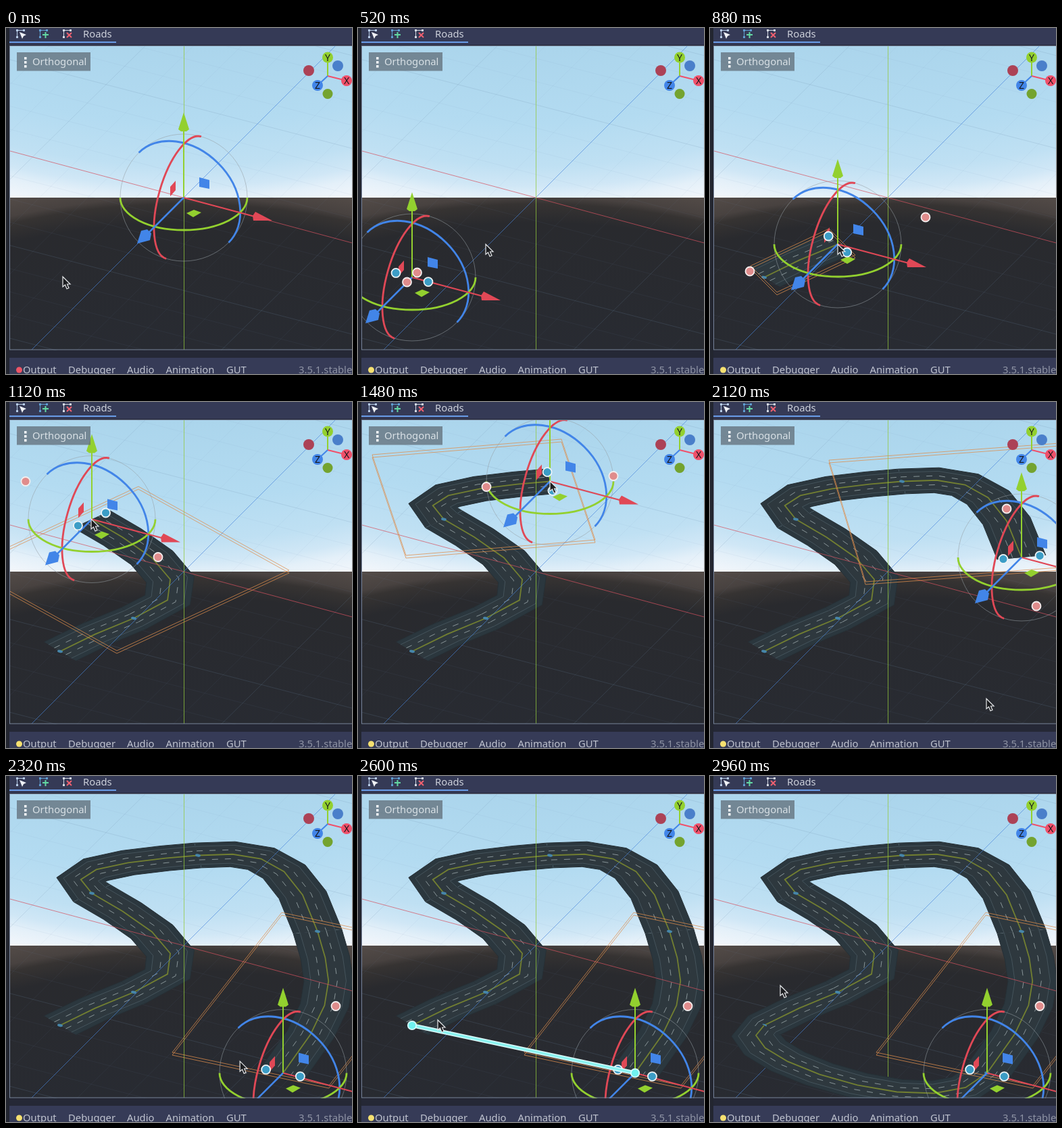
An HTML page with a canvas that plays this animation: 512 by 512 pixels, repeating every 3000 ms.

```html
<!DOCTYPE html>
<html>
<head>
<meta charset="utf-8">
<style>
  html, body { margin: 0; width: 512px; height: 512px; overflow: hidden; background: #252836; }
  canvas { display: block; }
</style>
</head>
<body>
<canvas id="stage" width="512" height="512"></canvas>
<script>
const g = document.getElementById('stage').getContext('2d');
const LOOP = 3000, STEP = 40, LINK_AT = 2560, CLOSE_AT = 2760;
const RED = '#e04856', GREEN = '#93d02f', BLUE = '#4285e8';
const ORANGE = 'rgba(222,142,76,.75)';

// Screen directions of the ground axes, and road sizes in ground units.
const X = [131, 34], Z = [-69, 68];
const HALF_ROAD = .245, HALF_LANES = .185;

const ORIGIN = [263, 251];
// Road points: time placed, position, heading, curve reach before and after,
// first heading shown (aim) and three corners of the selection box.
const POINTS = [
  { at: 120, pos: [80,369], dir: [80,-36], before: 1, after: .4, aim: [7.5,-7] },
  { at: 640, pos: [189,320], dir: [130,-40], before: .3, after: 1,
    box: [[60,352], [176,297], [215,336]] },
  { at: 1120, pos: [127,173.5], dir: [-98,-56], before: .7, after: .7,
    box: [[196,125], [419,249], [164,368]] },
  { at: 1400, pos: [284,117.5], dir: [94,-8], before: .7, after: 1,
    box: [[21,78], [301,55], [351,204]] },
  { at: 1840, pos: [461,230], dir: [22,72], before: 1.5, after: 1,
    box: [[694,232], [230,266], [176,86]] },
  { at: 2200, pos: [410,439.5], dir: [-78,99], before: 1.1, after: .87,
    box: [[478,458], [246,409], [408,202]] }
];

// Pointer moves: start time, end time, destination.
const MOVES = [
  [40, 160, [80,370]], [360, 520, [189,320]], [920, 1120, [126,173]],
  [1200, 1400, [284,117]], [1480, 1760, [461,230]], [1840, 2120, [409,439]],
  [2200, 2600, [118,361]], [2600, 2720, [81,369]], [2760, 2960, [104,310]]
];

const add = (a, b, k = 1) => [a[0] + b[0] * k, a[1] + b[1] * k];
const mix = (a, b, k) => [a[0] + (b[0] - a[0]) * k, a[1] + (b[1] - a[1]) * k];
const distance = (a, b) => Math.hypot(a[0] - b[0], a[1] - b[1]);

// Unit ground vector at right angles to a screen direction, back on screen.
function sideways([x, y]) {
  const u = x * Z[1] - y * Z[0], v = y * X[0] - x * X[1], size = Math.hypot(u, v);
  return add([X[0] * -v / size, X[1] * -v / size], Z, u / size);
}

// Road segment as a list of cross-sections along a cubic curve.
function segment(from, to) {
  const p = [from.pos, add(from.pos, from.dir, from.after),
    add(to.pos, to.dir, -to.before), to.pos];
  const hull = distance(p[0], p[1]) + distance(p[1], p[2]) + distance(p[2], p[3]);
  const steps = Math.round((hull + distance(p[0], p[3])) / 96);
  return Array.from({ length: steps + 1 }, (_, i) => {
    const t = i / steps, mid = mix(p[1], p[2], t);
    const a = mix(mix(p[0], p[1], t), mid, t), b = mix(mid, mix(p[2], p[3], t), t);
    return { center: mix(a, b, t), side: sideways(add(b, a, -1)) };
  });
}
const SEGMENTS = POINTS.map((p, i) => segment(p, POINTS[(i + 1) % POINTS.length]));

function path(points, close) {
  g.beginPath();
  points.forEach(p => g.lineTo(p[0], p[1]));
  if (close) g.closePath();
}
function line(points, color, width = 1, close = false) {
  path(points, close);
  g.strokeStyle = color; g.lineWidth = width; g.stroke();
}
function fill(points, color) {
  path(points, true);
  g.fillStyle = color; g.fill();
}
function rect(x, y, w, h, color) {
  g.fillStyle = color; g.fillRect(x, y, w, h);
}
function disc([x, y], r, color, rim) {
  g.beginPath(); g.arc(x, y, r, 0, 7);
  g.fillStyle = color; g.fill();
  if (rim) { g.strokeStyle = rim; g.lineWidth = 1.8; g.stroke(); }
}
function arc(rx, ry, turn, from, to, color, width) {
  g.beginPath(); g.ellipse(0, 0, rx, ry, turn, from, to);
  g.strokeStyle = color; g.lineWidth = width; g.stroke();
}
function text(s, x, y, color, size = 14.8) {
  g.font = size + 'px "Noto Sans", sans-serif';
  g.fillStyle = color; g.fillText(s, x, y);
}
// Wide circles bend the horizon haze up or down towards the sides.
function haze(y, inner, outer, colors) {
  const grad = g.createRadialGradient(263, y, inner, 263, y, outer);
  for (const at in colors) grad.addColorStop(+at, colors[at]);
  return grad;
}

function background() {
  rect(6, 26, 506, 225, haze(-900, 926, 1180,
    { 0: '#abd5ec', .45: '#b3dbf1', .7: '#bfe0f3', .82: '#d0e7f6', .89: '#e4f0f9', 1: '#f4f7fb' }));
  rect(6, 251, 506, 226, haze(1402, 925, 1180,
    { 0: '#282b32', .74: '#292a2e', .85: '#363332', .89: '#484240', 1: '#544c48' }));
  for (let i = -14; i <= 14; i++) {
    if (!i) continue;
    const color = `rgba(112,140,172,${i % 4 ? .08 : .2})`;
    const a = add(ORIGIN, X, i * .43), b = add(ORIGIN, Z, i * .4);
    line([add(a, Z, -9), add(a, Z, 9)], color);
    line([add(b, X, -6), add(b, X, 6)], color);
  }
}
function axes() {
  line([[6,182], ORIGIN, [512,318]], 'rgba(214,82,96,.7)');
  line([[38,476], ORIGIN, [488,26]], 'rgba(74,134,220,.65)');
  line([[263.5,26], [263.5,476]], 'rgba(146,200,60,.75)');
}

function road(rows) {
  const edge = f => rows.map(r => add(r.center, r.side, f * HALF_ROAD));
  const both = (f, color) => { line(edge(-f), color); line(edge(f), color); };
  fill([...edge(-1), ...edge(1).reverse()], '#2b373e');
  fill([...edge(-.74), ...edge(.74).reverse()], '#2e383e');
  both(1, '#263036');
  both(.72, '#44535b');
  g.setLineDash([9, 10]);
  both(.36, 'rgba(184,198,200,.65)');
  g.setLineDash([]);
  line(edge(0), '#727f31', 1.8);
  g.beginPath(); g.ellipse(...rows[0].center, 4, 2, .2, 0, 7);
  g.fillStyle = '#4686aa'; g.fill();
}

function gizmo([x, y]) {
  g.save();
  g.translate(x, y);
  arc(94, 94, 0, 0, 7, 'rgba(150,158,164,.55)', 1);
  arc(94, 72, Math.PI / 4, Math.PI, 2 * Math.PI, BLUE, 2.8);
  arc(94, 37, 1.85, 0, Math.PI, RED, 2.8);
  arc(94, 48, 0, 0, Math.PI, GREEN, 2.8);
  line([[0,0], [0,-100]], GREEN, 2);
  line([[0,0], [105,28]], RED, 2);
  line([[0,0], [-54,54]], BLUE, 2.5);
  fill([[0,-126], [8,-101], [4,-98], [-4,-98], [-8,-101]], GREEN);
  fill([[131,34], [106,21], [102,27], [103,34]], RED);
  fill([[-69,68], [-63,49], [-54,47], [-48,53], [-50,63]], BLUE);
  fill([[23,-30], [38,-26], [38,-13], [23,-16]], BLUE);
  fill([[-20,-16], [-12,-25], [-12,-11], [-20,-2]], RED);
  fill([[4,23], [15,18], [26,22], [14,29]], GREEN);
  g.restore();
}
function selection({ pos, dir, aim = dir, box }) {
  if (box) {
    const [a, b, c] = box, corners = [a, b, c, add(add(a, c), b, -1)];
    for (const dy of [0, 4]) line(corners.map(p => add(p, [0, dy])), ORANGE, 1, true);
  }
  gizmo(pos);
  for (const k of [-1, 1]) {
    disc(add(pos, aim, k), 6.5, '#e08c8c', '#f4eeee');
    disc(add(pos, sideways(aim), k * HALF_LANES), 6.5, '#3c9dc6', '#eef4f6');
  }
}
function link() {
  const ends = [POINTS[0].pos, POINTS[5].pos];
  line(ends, '#e6ffff', 6);
  line(ends, '#8cf3f0', 3.5);
  ends.forEach(p => disc(p, 6.2, '#70f2f0', '#d8ffff'));
}

function compass() {
  disc([448,63], 8, '#ac4256');
  disc([491,56], 8, '#4a7fca');
  disc([476,97.5], 7.5, '#74a32f');
  g.textAlign = 'center';
  for (const [name, x, y, color] of [['Y',476,43.5,GREEN], ['X',504,78,'#f0506a'], ['Z',461,85,BLUE]]) {
    line([[476,71], [x, y]], color, 2);
    disc([x, y], 8, color);
    text(name, x, y + 5, '#16181c', 14);
  }
  g.textAlign = 'left';
}
function icon(x, color) {
  for (const [dx, dy] of [[0,0], [10,0], [0,10]]) rect(x + dx, 2 + dy, 3, 3, color);
  line([[x + 3,3.5], [x + 10,3.5]], color);
  line([[x + 1.5,5], [x + 1.5,12]], color);
}
function chrome(ready) {
  rect(0, 0, 512, 25, '#353a56');
  rect(0, 477, 512, 11, '#252836');
  rect(5, 488, 507, 24, '#363b57');
  rect(0, 0, 5, 512, '#232630');
  rect(5, 20, 158, 2, '#6a9de8');
  g.strokeStyle = '#77839a'; g.lineWidth = 1;
  g.strokeRect(5.5, 26.5, 520, 449.5);
  icon(15, '#b6cbe6');
  fill([[20,6], [30,10], [26,12], [24,16]], '#f0f2f6');
  icon(49, '#5f9ed0');
  line([[54,10], [63,10]], '#62d8a2', 2);
  line([[58.5,6], [58.5,15]], '#62d8a2', 2);
  icon(84, '#d3d8e2');
  line([[90,7], [97,14]], '#f06070', 2);
  line([[97,7], [90,14]], '#f06070', 2);
  text('Roads', 114, 13.5, '#cdd1db');
  disc([19.5,506], 4.5, ready ? '#f6e070' : '#ee5566');
  for (const [s, x] of [['Output',25], ['Debugger',92], ['Audio',179], ['Animation',236.5], ['GUT',326]])
    text(s, x, 511, '#bfc3cf');
  text('3.5.1.stable', 433, 511, '#8f94a5');
}
function viewLabel() {
  rect(16, 36, 109, 27.5, 'rgba(98,111,122,.76)');
  for (const y of [43, 49, 55]) rect(27, y, 3.6, 3.6, '#f0f3f5');
  text('Orthogonal', 39, 55, '#d9e1e6');
}

function pointer(t) {
  let tip = [84, 368];
  for (const [from, to, goal] of MOVES) {
    const k = Math.min(1, Math.max(0, (t - from) / (to - from)));
    tip = mix(tip, goal, k * k * (3 - 2 * k));
  }
  const shape = [[0,0], [0,15], [3.5,12], [6,18], [9,16.7], [6.5,11], [11,11]].map(p => add(p, tip));
  fill(shape, '#1c1d20');
  line(shape, '#e6e8ea', 1.2, true);
}

function draw(t) {
  const placed = POINTS.filter(p => p.at <= t).length;
  g.clearRect(0, 0, 512, 512);
  g.save();
  g.beginPath(); g.rect(6, 26, 506, 451); g.clip();
  background();
  SEGMENTS.slice(0, Math.max(0, placed - 1)).forEach(road);
  axes();
  if (t >= CLOSE_AT) road(SEGMENTS[5]);
  if (placed) selection(POINTS[placed - 1]);
  else gizmo(ORIGIN);
  if (t >= LINK_AT && t < CLOSE_AT) link();
  compass();
  viewLabel();
  pointer(t);
  g.restore();
  chrome(placed > 0);
}

const start = performance.now();
function tick() {
  const t = (performance.now() - start) % LOOP;
  draw(Math.floor(t / STEP) * STEP);
  requestAnimationFrame(tick);
}
tick();
</script>
</body>
</html>
```
